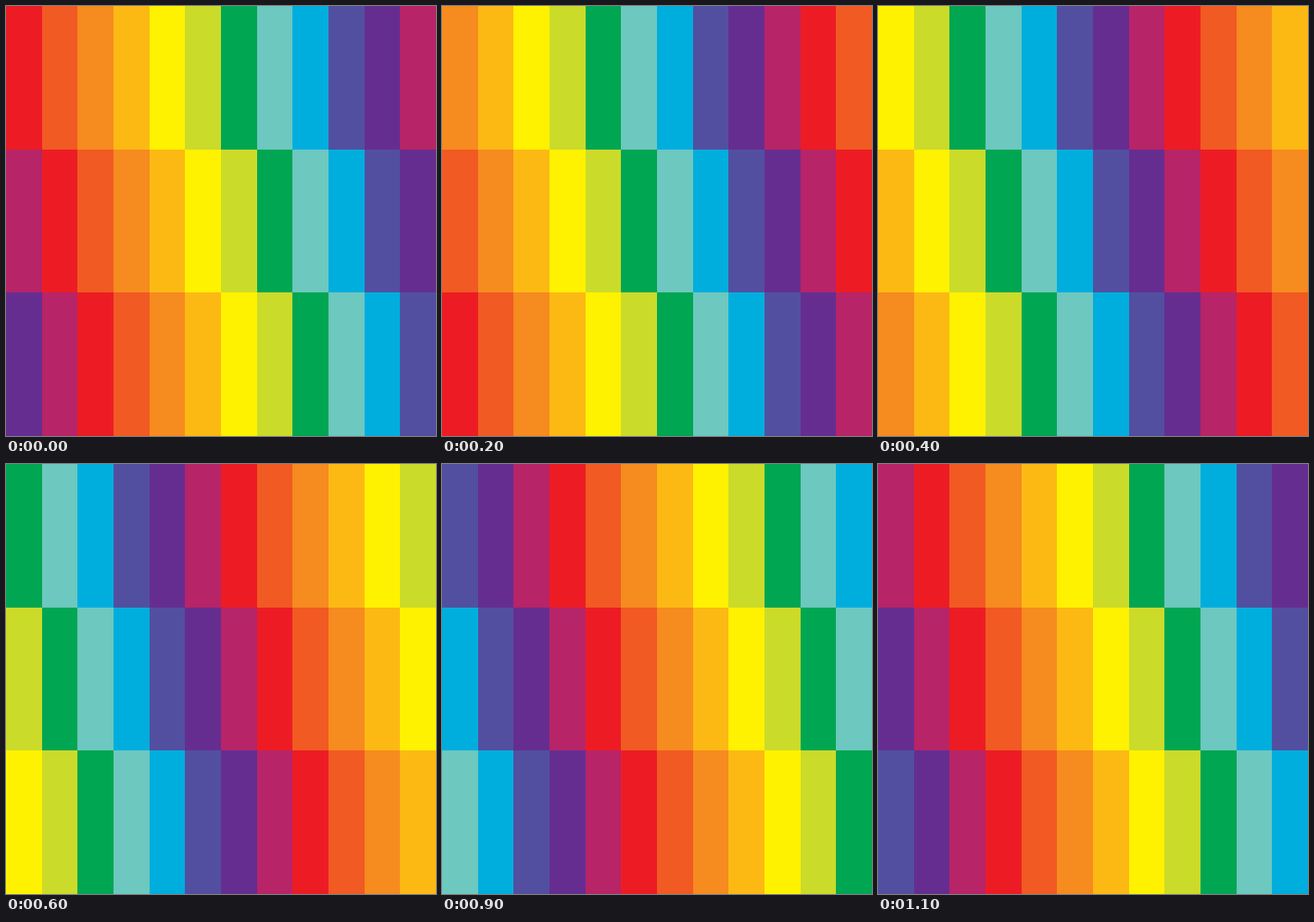
Animation of 500 by 500 pixels, one loop 1.2 s. Source, as an HTML page:

```html
<!DOCTYPE html>
<html lang="en">
<head>
<meta charset="utf-8">
<title>Colour bars</title>
<style>
  html, body { margin: 0; width: 100%; height: 100%; overflow: hidden; }
  svg { display: block; width: 100%; height: 100%; }
</style>
</head>
<body>
<svg id="stage" viewBox="0 0 500 500" shape-rendering="crispEdges"></svg>
<script>
  const COLORS = [
    '#ed1c24', '#f15a22', '#f68b1f', '#fdb913', '#fff200', '#cbdb2a',
    '#00a651', '#6dc8bf', '#00aede', '#524fa1', '#662d91', '#b72467'
  ];
  const SIZE = 500, ROWS = 3, COLS = COLORS.length, STEP_MS = 100;
  const stage = document.getElementById('stage');
  const edge = (i, count) => Math.round(i * SIZE / count);

  function makeBar(row, col) {
    const rect = document.createElementNS('http://www.w3.org/2000/svg', 'rect');
    const x = edge(col, COLS), y = edge(row, ROWS);
    const box = { x, y, width: edge(col + 1, COLS) - x, height: edge(row + 1, ROWS) - y };
    for (const key in box) rect.setAttribute(key, box[key]);
    stage.append(rect);
    return { rect, offset: col - row + COLS };
  }

  const bars = [];
  for (let row = 0; row < ROWS; row++)
    for (let col = 0; col < COLS; col++) bars.push(makeBar(row, col));

  // Each step moves every colour one column to the left.
  function draw(time) {
    const step = Math.floor(time / STEP_MS) % COLS;
    for (const { rect, offset } of bars)
      rect.setAttribute('fill', COLORS[(offset + step) % COLS]);
  }

  const start = performance.now();
  function tick() {
    draw(performance.now() - start);
    requestAnimationFrame(tick);
  }
  tick();
</script>
</body>
</html>
```
